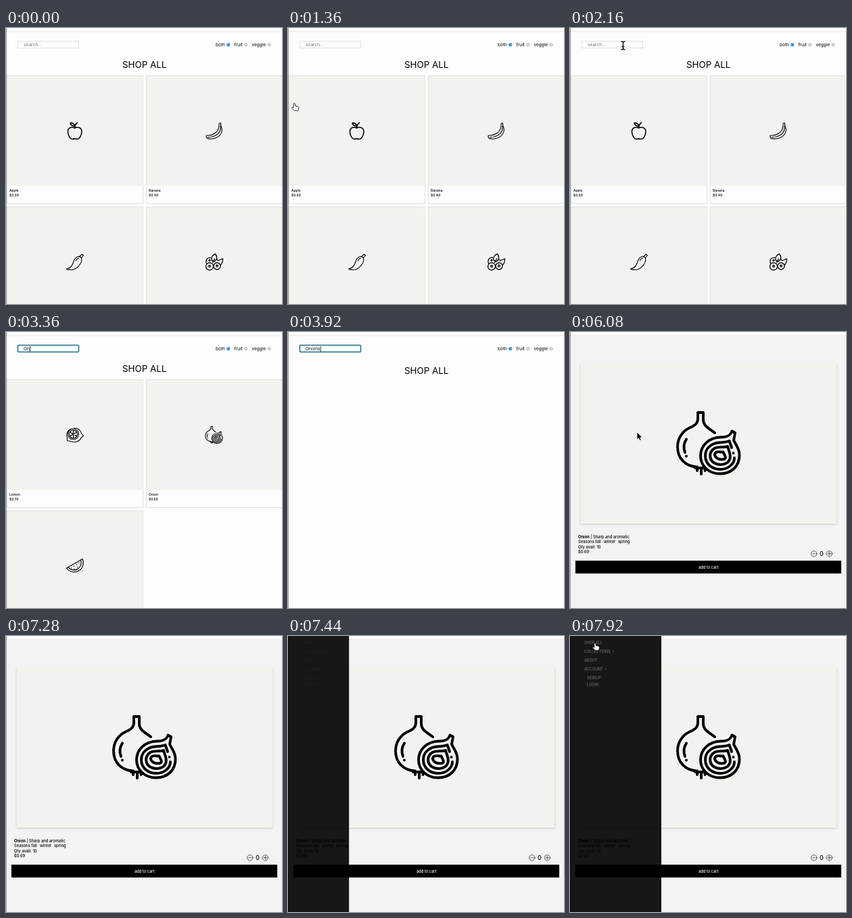
Recreate the animation shown at these times as an HTML page. Size 408 by 408 pixels, loop 8000 ms.

```html
<!DOCTYPE html>
<html lang="en">
<head>
<meta charset="utf-8">
<title>Produce shop</title>
<style>
  html, body { margin: 0; width: 100%; height: 100%; overflow: hidden; background: #fdfdfd; }
  svg { display: block; width: 100vw; height: 100vh; font: 6.5px Inter, "Open Sans", sans-serif; }
  .line { fill: none; stroke: #000; stroke-linecap: round; stroke-linejoin: round; }
  .mid { text-anchor: middle; }
  .panel { fill: #f2f3ee; filter: drop-shadow(0 1px 1px rgba(0, 0, 0, .2)); }
</style>
</head>
<body>
<svg viewBox="0 0 408 408">
  <rect width="408" height="408" fill="#fdfdfd"/>

  <g id="shop">
    <rect id="field" x="17.5" y="19.5" width="90" height="10" fill="#fff"/>
    <text id="query" x="26" y="27"></text>
    <rect id="caret" y="21" width=".8" height="8"/>
    <text x="310" y="27">both</text>
    <text x="337.5" y="27">fruit</text>
    <text x="363.5" y="27">veggie</text>
    <circle cx="328.7" cy="24.7" r="2.3" fill="#fff" stroke="#1b78d0" stroke-width=".9"/>
    <circle cx="328.7" cy="24.7" r="1.5" fill="#1b78d0"/>
    <g fill="#fff" stroke="#666" stroke-width=".7">
      <circle cx="354.7" cy="24.7" r="1.8"/>
      <circle cx="389" cy="24.7" r="1.8"/>
    </g>
    <text id="title" class="mid" x="204.7" font-size="13.4">SHOP ALL</text>
    <g id="cards"></g>
  </g>

  <g id="detail">
    <rect y="6" width="408" height="402" fill="#f3f3f3"/>
    <rect class="panel" x="15.5" y="46" width="379" height="237.5"/>
    <g id="big"></g>
    <g font-size="5.8" font-weight="500">
      <text x="12" y="304.6"><tspan font-weight="700">Onion</tspan> | Sharp and aromatic</text>
      <text y="312.1"><tspan x="12">Seasons:</tspan><tspan x="37.5">fall</tspan><tspan x="50">winter</tspan><tspan x="71">spring</tspan></text>
      <text x="12" y="319.7">Qty avail: 10</text>
      <text x="12" y="327.3">$0.69</text>
    </g>
    <g class="line" stroke-width=".65">
      <circle cx="360.7" cy="327.8" r="4.2"/>
      <circle cx="383.3" cy="327.8" r="4.2"/>
      <path d="M358.5 327.8h4.4M381.1 327.8h4.4M383.3 325.6v4.4"/>
    </g>
    <text class="mid" x="372" y="331.2" font-size="9" font-weight="500">0</text>
    <rect x="8" y="338" width="393" height="19"/>
    <text class="mid" x="204.7" y="350" font-size="5.7" font-weight="500" fill="#fff">add to cart</text>
  </g>

  <rect y="5" width="408" height="1" fill="#e6e6e8"/>
  <rect width="1" height="408" fill="#999"/>

  <rect id="drawer" height="408" fill="#000" fill-opacity=".905"/>
  <g id="menu" font-size="5.5" fill="#777">
    <text x="21" y="11.5">SHOP ALL</text>
    <text x="21" y="24.8">COLLECTIONS</text>
    <text x="21" y="38">ABOUT</text>
    <text x="21" y="51">ACCOUNT</text>
    <text x="25" y="64.2">SIGNUP</text>
    <text x="25" y="74.2">LOGIN</text>
    <path d="M62.5 22l1.3 1.2 1.3-1.2M51.5 49.6l1.3-1.2 1.3 1.2" fill="none" stroke="#777" stroke-width=".7"/>
  </g>

  <g id="cursor">
    <path id="arrow" d="M0 0V11l2.5-2.3 1.7 3.8 2-.9-1.7-3.6H7.8Z" stroke="#fff" stroke-width=".7"/>
    <path id="hand" d="M-1.2 1Q0-.8 1.2 1V4l4 1q1.5.6 1.3 2l-.8 4.2H.1L-3.6 7.5q-.6-1.4.8-1.2L-1.2 7.2Z" fill="#fff" stroke="#000" stroke-width=".8"/>
    <path id="beam" class="line" stroke-width="1.3" d="M-2.5-6Q0-6 0-4V4Q0 6-2.5 6M2.5-6Q0-6 0-4M0 4Q0 6 2.5 6M-1.6 1.6H1.6"/>
  </g>
</svg>

<script>
const LOOP = 8000;
const $ = id => document.getElementById(id);
const show = (id, on) => $(id).style.display = on ? '' : 'none';
const set = (id, attrs) => { for (const k in attrs) $(id).setAttribute(k, attrs[k]); };
const clamp = v => Math.min(1, Math.max(0, v));
const stroke = (w, d) => `<path class="line" stroke-width="${w}" d="${d}"/>`;
const ring = (x, y, r) => `M${x - r} ${y}a${r} ${r} 0 1 0 ${2 * r} 0a${r} ${r} 0 1 0 ${-2 * r} 0Z`;

const onion = stroke(3.9,
  // whole bulb, shine and roots
  'M214 149C206 143 197 139 197 130V119H189V128C189 136 183 139 176 142C166 147 159 157 159 170C159 187 171 199 188 199.5' +
  'M172 158.5Q166 168 170 178M172 183.4v.1M185 201H200M188 201V205M194 201V210M199.5 201V205' +
  // cut half and its layers
  'M239.5 146.5C237 154 231 155.5 223 155.5C205 156 193 168 193 183C193 198 205 209.5 222 209.5C239 209.5 250.5 198 250.5 182C250.5 172 245 167 242 160L244 149Z' +
  'M239 171L235.5 161C228 164.5 220 162 212 165.5C204 169 200 176 200 183C200 195 210 203 222 203C234 203 243 195 243 186M241.5 179v.1' +
  'M233 169C227 171.5 220 168.5 213.5 172C204 178 206 190 214 194C222 198 234 196 236.5 187C238 180 234.5 176 233 169Z' +
  'M226.500 177.500C222 178 218 175.500 215 178.500C212 182 216 187 221 188C227 189 231 188 229.500 184Z');

// Small icons fill a 26 by 26 box.
const items = [
  ['Apple', '$0.99', stroke(1.6, 'M13 9C10 7 2.5 7 3 15C3.5 21 7 26 10 25.2Q13 24 16 25.2C19 26 23 21 23.5 15C24 7 16 7 13 9ZQ13 4 17 1M13 6C9 6 7 4 6.5 1.5C10 1 13 3 13 6Z')],
  ['Banana', '$0.49', stroke(1.1, 'M20.5 2L23 1.5V5C28 14 22 24 9 25C5 25 2 24 1.5 22.5V20C12 20 20 15 20.5 5ZM22.5 6C24 16 16 22 4 22.5')],
  ['Chili', '$0.29', stroke(1.1, 'M1 23C8 22 10 17 12 11C14 5 20 3 23 7C25 14 16 25 7 24.5C4 24.5 2 24 1 23ZM20 5L24 1.5L25.8 3L23 7M15 11Q16 7.5 19 7.5')],
  ['Blueberry', '$2.99', stroke(1.3, ring(6.5, 19.5, 5.5) + ring(17.5, 19, 5) + 'M2 15C0 10 3 6 8 6.5M10 11C8 6 11 2 15 1C18 5 18 9 14 12ZM14 8L11 14M17 8L19 11L26 8C26 13 25 15 23 17' +
    ring(6.5, 19, 1.4) + ring(17.5, 18.5, 1.4) + ring(6.5, 10.5, 1))],
  ['Lemon', '$0.79', stroke(1.1, ring(11, 12, 8) + ring(11, 12, 6) + 'M11 6V18M5.8 9L16.2 15M5.8 15L16.2 9M12 3.5C18 2 22 7 23 11L26 14.5L23 17C20 23 14 25 8 23L2 21.5V17C0 11 3 4 11 4')],
  ['Onion', '$0.69', `<g transform="translate(-43.8 -32.4) scale(.277)">${onion}</g>`],
  ['Watermelon', '$3.99', stroke(1.2, 'M1 16L24.5 2.5A13.6 13.6 0 0 1 1 16ZM3.5 14.8A10.8 10.8 0 0 0 22 4.2M8 15.5v.5M12 13v.5M12.5 17v.4M16 10.5v.5M17 14v.5M19.5 8v.5')],
];

$('big').innerHTML = onion;
$('cards').innerHTML = items.map(([name, price, icon], i) => `<g id="card${i}">
  <rect x=".5" y=".5" width="201" height="189" fill="#fdfdfd" stroke="#dfe0e5"/>
  <rect x="1" y="1" width="200.5" height="162.5" fill="#f2f3ee"/>
  <g transform="translate(87.5 69)">${icon}</g>
  <g font-size="4.9" font-weight="500"><text x="4" y="172">${name}</text><text x="4" y="179">${price}</text></g></g>`).join('');

const typed = [[0, ''], [2880, 'O'], [3200, 'On'], [3520, 'Oni'], [3640, 'Onio'], [3760, 'Onion'], [3920, 'Onions'], [4800, 'Onion']];

// Pointer stops: time, x, y
const stops = [
  [1280, -20, 116], [1360, 9, 111], [1520, 70, 93], [1760, 70, 93], [2160, 78.5, 26], [5120, 78.5, 26],
  [5121, 76, 44], [5200, 76, 44], [5520, 99, 148], [6640, 99, 148], [6800, 34, -14],
  [7640, 37, -14], [7840, 37, 10],
];

function pointer(t) {
  const i = stops.findIndex(s => s[0] > t);
  if (i < 1) return stops[i < 0 ? stops.length - 1 : 0].slice(1);
  const [a, b] = [stops[i - 1], stops[i]];
  const k = (t - a[0]) / (b[0] - a[0]);
  return [a[1] + (b[1] - a[1]) * k, a[2] + (b[2] - a[2]) * k];
}

// CSS "ease" curve
function ease(p) {
  let lo = 0, hi = 1, u = p;
  const curve = (a, b) => 3 * a * u * (1 - u) ** 2 + 3 * b * u * u * (1 - u) + u ** 3;
  for (let n = 0; n < 20; n++) {
    u = (lo + hi) / 2;
    if (curve(.25, .25) < p) lo = u; else hi = u;
  }
  return curve(.1, 1);
}

function drawShop(t) {
  const text = typed.filter(s => s[0] <= t).pop()[1];
  const found = items.filter(([name]) => name.toLowerCase().includes(text.toLowerCase()));
  const short = found.length < 2;
  const focus = t >= 2320;
  set('field', { stroke: focus ? '#1b7186' : '#dcdfe8', 'stroke-width': focus ? 1.5 : 1, rx: focus ? 1 : 0 });
  set('query', { fill: text ? '#111' : '#858585', 'font-weight': text ? 400 : 500 });
  $('query').textContent = text || 'search...';
  show('caret', t >= 2480 && t < 4480);
  set('caret', { x: 26.2 + (text ? $('query').getComputedTextLength() : 0) });
  set('title', { y: short ? 62 : 59 });
  items.forEach((item, i) => {
    const n = found.indexOf(item);
    show('card' + i, n >= 0);
    set('card' + i, { transform: `translate(${1 + n % 2 * 206} ${(short ? 75 : 70) + (n >> 1) * 194})` });
  });
}

function drawCursor(t, inShop) {
  const [x, y] = pointer(t);
  const kind = inShop ? (y > 70 ? 'hand' : y < 31 ? 'beam' : 'arrow') : t > 7600 ? 'hand' : 'arrow';
  for (const k of ['arrow', 'hand', 'beam']) show(k, k === kind);
  show('cursor', t >= 1280 && (t < 2880 || t >= 5200));
  set('cursor', { transform: `translate(${x} ${y})` });
}

function draw(t) {
  const inShop = t < 6000;
  show('shop', inShop);
  show('detail', !inShop);
  if (inShop) drawShop(t);
  set('drawer', { width: 135 * ease(clamp((t - 7285) / 400)) });
  set('menu', { opacity: clamp((t - 7400) / 500) });
  drawCursor(t, inShop);
}

const start = performance.now();
function tick() {
  draw((performance.now() - start) % LOOP);
  requestAnimationFrame(tick);
}
tick();
</script>
</body>
</html>
```
